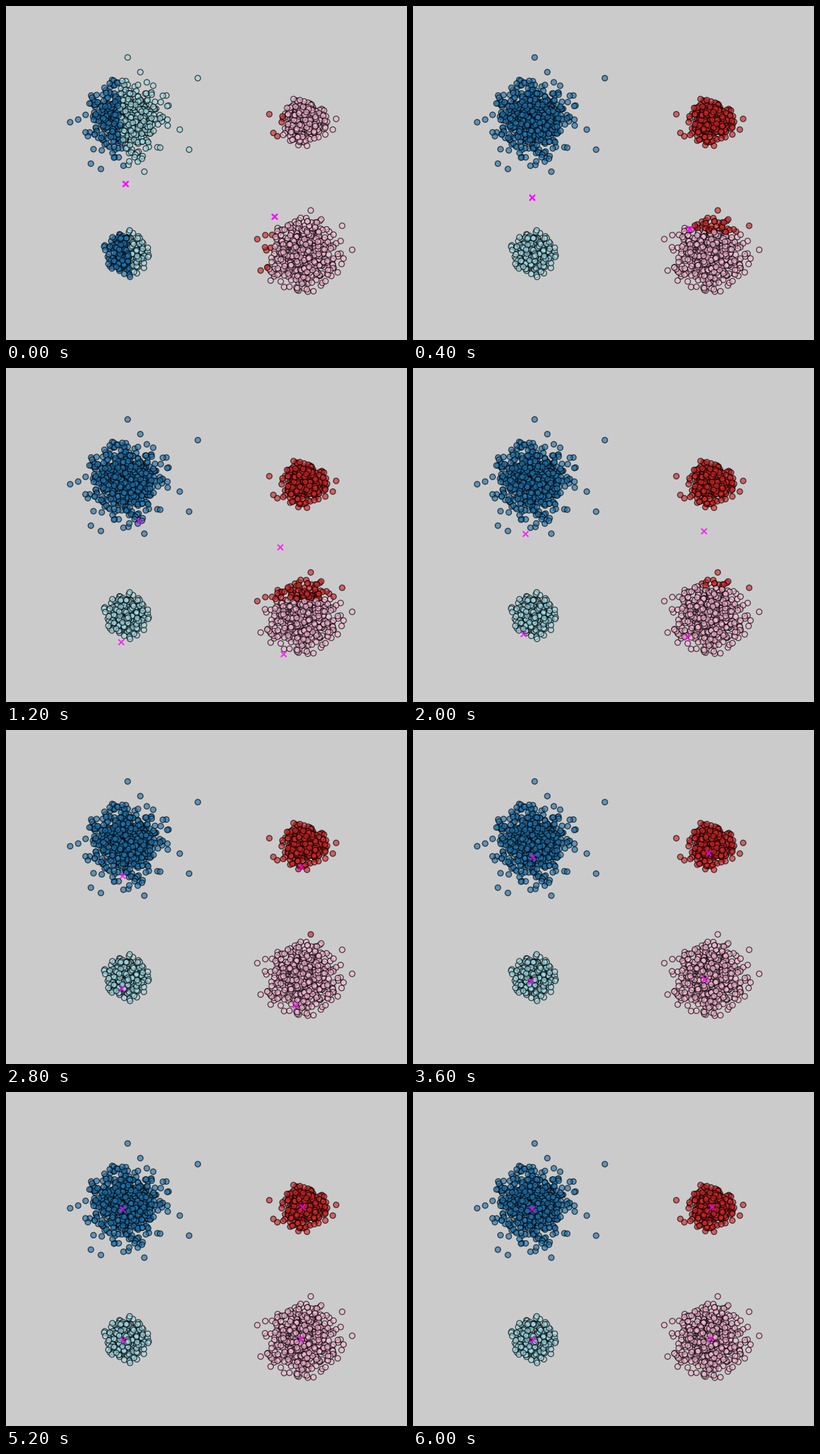
Animation, 600 px wide and 500 px high, one loop 6.4 s. Source, as a matplotlib script:

```python
import numpy as np
import matplotlib.pyplot as plt
from matplotlib.animation import FuncAnimation

W, H, DPI = 600, 500, 100
FRAMES, INTERVAL = 16, 400
BACKGROUND = "#cbcbcb"
PALETTE = plt.cm.tab20(np.linspace(0, 1, 4))[:, :3]
CUT = 2.5

rng = np.random.default_rng(7)

# Each cloud: size, centre, spread
BLOBS = [(600, (180, 172), 27), (350, (446, 173), 15),
         (520, (446, 370), 24), (320, (180, 371), 14.5)]

# Points far from their cloud
STRAYS = [
    (182, 77), (287, 108), (201, 99), (96, 174), (108, 170), (274, 215),
    (260, 185), (242, 179), (207, 248), (142, 244), (127, 236), (240, 134),
    (394, 162), (494, 169), (489, 185), (400, 190), (406, 195),
    (376, 349), (388, 343), (381, 396), (396, 411), (503, 329),
    (518, 365), (505, 378), (460, 427), (456, 306),
]


def blob(size, centre, spread):
    """Gaussian cloud clipped at a radius."""
    unit = rng.normal(size=(size * 2, 2))
    return unit[np.hypot(*unit.T) < CUT][:size] * spread + centre


def pairs(left, right, left_dir, right_dir):
    """Two nearly coincident pairs, each split along its own direction."""
    a, b, u, v = (np.array(p) for p in (left, right, left_dir, right_dir))
    return np.array([a - u / 2, b - v / 2, b + v / 2, a + u / 2])


# Centroids in the order of the clouds, at the steps where they turn
final = np.array([(178, 175), (447, 172), (445, 369), (179, 371)])
PATH = {
    0: pairs((178, 266), (401, 315), (1, -0.07), (1, 0.1)),
    1: pairs((178, 286), (414, 333), (0, 1), (-0.12, 1)),
    2: [(188, 243), (415, 301), (412, 427), (175, 395)],
    3: [(199, 229), (410, 268), (415, 428), (172, 410)],
    5: [(168, 248), (435, 244), (410, 403), (165, 398)],
    6: [(172, 232), (440, 215), (432, 431), (172, 392)],
    9: [(179, 190), (442, 184), (436, 373), (176, 376)],
    13: final - (4, 0),
    15: final,
}
STEPS = list(PATH)
TRACKS = np.array([np.ravel(p) for p in PATH.values()]).T


def centroids_at(step):
    return np.array([np.interp(step, STEPS, t) for t in TRACKS]).reshape(-1, 2)


def labels_for(centroids):
    gaps = points[:, None] - centroids
    return (gaps ** 2).sum(axis=2).argmin(axis=1)


points = rng.permutation(np.vstack([blob(*b) for b in BLOBS] + [STRAYS]))

fig = plt.figure(figsize=(W / DPI, H / DPI), dpi=DPI, facecolor=BACKGROUND)
ax = fig.add_axes([0, 0, 1, 1])
ax.set_xlim(0, W)
ax.set_ylim(H, 0)
ax.axis("off")

dots = ax.scatter(*points.T, s=36, c="white", edgecolors="black",
                  linewidths=1, alpha=0.65)
marks = ax.scatter(*centroids_at(0).T, s=36, c="#ff00ff", marker="x",
                   linewidths=1.5, alpha=0.8, zorder=3)


def update(step):
    centroids = centroids_at(step)
    dots.set_facecolor(PALETTE[labels_for(centroids)])
    marks.set_offsets(centroids)
    return dots, marks


anim = FuncAnimation(fig, update, frames=FRAMES, interval=INTERVAL,
                     repeat=True, repeat_delay=0)
plt.show()
```
